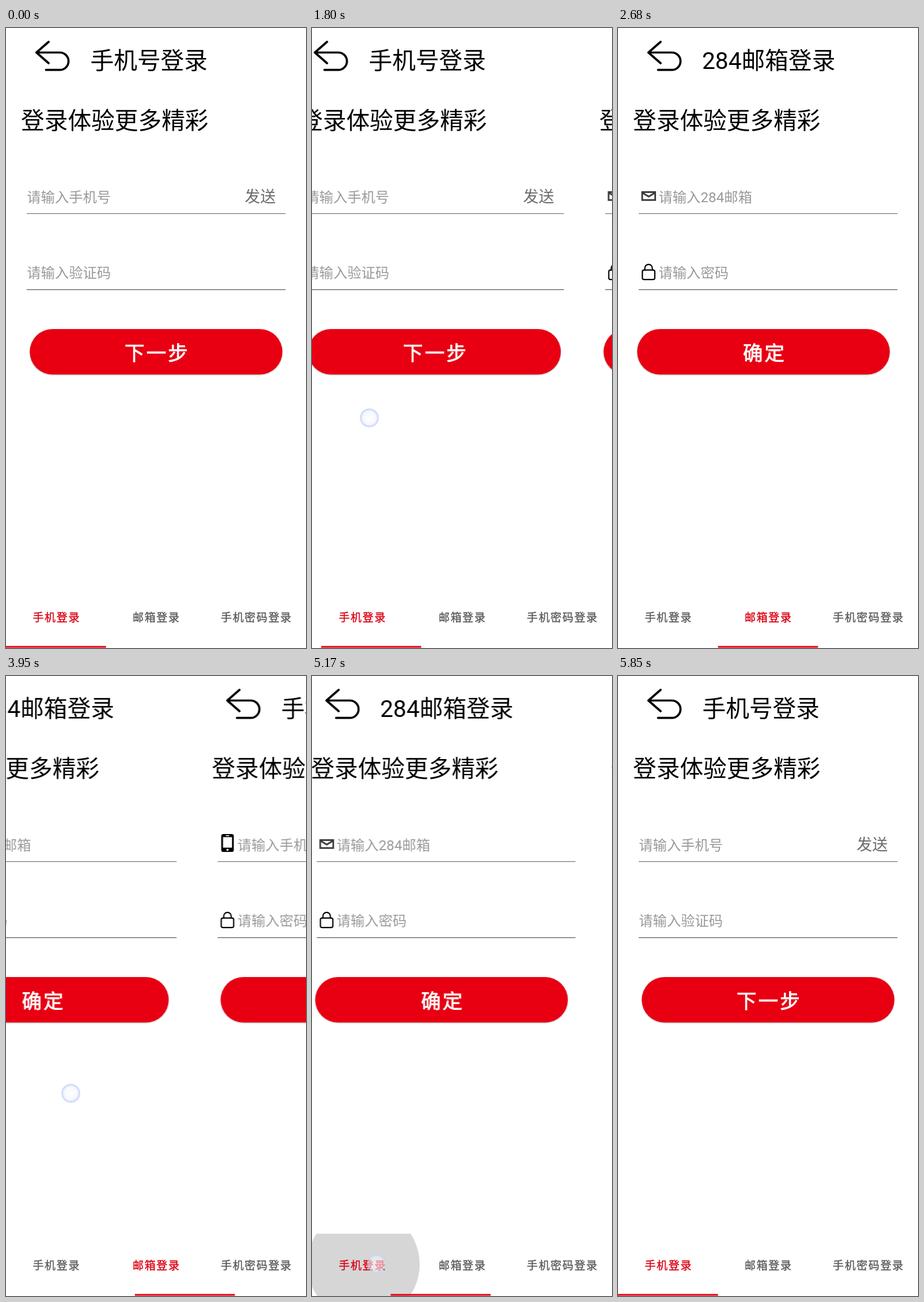
An HTML page that plays this animation: 521 by 1075 pixels, repeating every 6 s.

```html
<!DOCTYPE html>
<html lang="zh-CN">
<head>
<meta charset="utf-8">
<title>登录</title>
<style>
html, body { margin: 0; width: 100%; height: 100%; overflow: hidden; background: #fff; }
svg { display: block; width: 521px; height: 1075px; font-family: Roboto, "Noto Sans CJK SC", "Noto Sans CJK", sans-serif; }

.big { font-size: 40.7px; }
.hint { font-size: 24.3px; fill: #999; }
.send { font-size: 27px; fill: #6b6b6b; }
.btn { fill: #e80012; filter: drop-shadow(0 1.5px 1.3px rgba(0,0,0,.28)); }
.label, .tab { fill: currentColor; stroke: currentColor; }
.label { font-size: 34.5px; letter-spacing: 3.1px; color: #fff; stroke-width: .9px; }
.tab { font-size: 19px; letter-spacing: 1.67px; color: #5c5c5c; stroke-width: .4px; }
.stroke { fill: none; stroke: #000; stroke-linecap: round; stroke-linejoin: round; }

#pages, #bar, #ripple, #dot, .tab { animation: 6s linear infinite; }
#pages { animation-name: pages; }
#bar { animation-name: bar; fill: #e60012; }
#ripple { animation-name: ripple; }
#dot { animation-name: move, touch; }
.tab { animation-timing-function: step-end; }
.t1 { animation-name: tab1; }
.t2 { animation-name: tab2; }
.t3 { animation-name: tab3; }

@keyframes pages {
  0%, 27% { transform: translateX(0); animation-timing-function: ease-in; }
  30.02% { transform: translateX(-48px); }
  31.17% { transform: translateX(-125px); animation-timing-function: cubic-bezier(.22,1,.36,1); }
  39%, 62.33% { transform: translateX(-521px); animation-timing-function: ease-in; }
  65.85% { transform: translateX(-710.5px); }
  66.67% { transform: translateX(-830px); animation-timing-function: cubic-bezier(.22,1,.36,1); }
  71.5%, 84.17% { transform: translateX(-1042px); }
  86.18% { transform: translateX(-549.5px); animation-timing-function: cubic-bezier(.25,.5,.4,1); }
  91%, 100% { transform: translateX(0); }
}
@keyframes bar {
  0%, 27% { transform: translateX(0); animation-timing-function: ease-in; }
  30.02% { transform: translateX(16px); }
  31.17% { transform: translateX(41.7px); animation-timing-function: cubic-bezier(.22,1,.36,1); }
  39%, 62.33% { transform: translateX(173.67px); animation-timing-function: ease-in; }
  65.85% { transform: translateX(223.8px); }
  66.67% { transform: translateX(262px); animation-timing-function: cubic-bezier(.22,1,.36,1); }
  71.5%, 84.2% { transform: translateX(347.33px); animation-timing-function: cubic-bezier(.4,0,.2,1); }
  89.2%, 100% { transform: translateX(0); }
}
@keyframes ripple {
  0%, 79.67% { transform: translate(112px,1019px) scale(.2); opacity: 0; animation-timing-function: cubic-bezier(.2,.5,.4,1); }
  86.17%, 87% { transform: translate(89.5px,1020px) scale(.975); opacity: 1; }
  91%, 100% { transform: translate(87px,1021px) scale(1.02); opacity: 0; }
}
@keyframes move {
  0%, 26% { transform: translate(182px,672px); animation-timing-function: ease-in; }
  30.02% { transform: translate(99.5px,676px); }
  31.17%, 61% { transform: translate(30px,679px); }
  61.01%, 62% { transform: translate(326px,716px); animation-timing-function: ease-in; }
  65.85% { transform: translate(112.5px,723.5px); }
  66.67%, 77.9% { transform: translate(40px,726px); }
  78%, 100% { transform: translate(112px,1019px); }
}
@keyframes touch {
  0%, 25.16% { opacity: 0; }
  25.17%, 31.17% { opacity: 1; }
  31.2%, 60.99% { opacity: 0; }
  61.02%, 66.67% { opacity: 1; }
  66.7%, 77.99% { opacity: 0; }
  78.01%, 85% { opacity: 1; }
  86.17% { opacity: .7; }
  87%, 100% { opacity: 0; }
}
@keyframes tab1 {
  0% { color: #dc0012; }
  31.5% { color: #5c5c5c; }
  84.17%, 100% { color: #dc0012; }
}
@keyframes tab2 {
  31.5% { color: #dc0012; }
  66.8% { color: #5c5c5c; }
}
@keyframes tab3 {
  66.8% { color: #dc0012; }
  84.17% { color: #5c5c5c; }
}
</style>
</head>
<body>
<svg viewBox="0 0 521 1075">
  <defs>
    <g id="form">
      <path class="stroke" stroke-width="3.7" d="M74 24L52.8 42.5L74 61M52.8 42.5H93.5A15.1 15.1 0 0 1 93.5 72.7H69.5"/>
      <text class="big" x="26" y="174.5">登录体验更多精彩</text>
      <rect x="36" y="321" width="449.5" height="1.4" fill="#858585"/>
      <rect x="36" y="452.9" width="449.5" height="1.4" fill="#666"/>
    </g>
    <rect id="button" class="btn" x="41.3" y="522" width="438.7" height="78.7" rx="39.35"/>
    <g id="lock" class="stroke" stroke-width="2.2">
      <rect x="42.3" y="419.6" width="21.6" height="16.6" rx="3"/>
      <path d="M46.6 419.6V416.4a6.5 6.5 0 0 1 13 0V419.6"/>
    </g>
    <radialGradient id="glow">
      <stop offset="0" stop-color="#fff" stop-opacity=".75"/>
      <stop offset=".65" stop-color="#f4f7ff" stop-opacity=".8"/>
      <stop offset=".82" stop-color="#dfe7fd" stop-opacity=".9"/>
      <stop offset=".91" stop-color="#b9c9f6" stop-opacity=".95"/>
      <stop offset="1" stop-color="#d5e0fc" stop-opacity=".2"/>
    </radialGradient>
    <clipPath id="tabs"><rect y="967" width="521" height="108"/></clipPath>
  </defs>

  <rect width="521" height="1075" fill="#fff"/>

  <g id="pages">
    <g>
      <use href="#form"/>
      <text class="big" x="146.5" y="70.5">手机号登录</text>
      <text class="hint" x="36.3" y="301.7">请输入手机号</text>
      <text class="send" x="414.5" y="302">发送</text>
      <text class="hint" x="36.3" y="433.3">请输入验证码</text>
      <use href="#button"/>
      <text class="label" x="206.1" y="576">下一步</text>
    </g>
    <g transform="translate(521)">
      <use href="#form"/>
      <text class="big" x="146" y="70.5">284邮箱登录</text>
      <path d="M42 284.5H64.6V298.3H42ZM42 285.5L53.3 292.3L64.6 285.5" fill="none" stroke="#3c3c3c" stroke-width="2.9"/>
      <text class="hint" x="70.5" y="301.7">请输入284邮箱</text>
      <use href="#lock"/>
      <text class="hint" x="70.5" y="433.3">请输入密码</text>
      <use href="#button" x="-8"/>
      <text class="label" x="217" y="576">确定</text>
    </g>
    <g transform="translate(1042)">
      <use href="#form"/>
      <text class="big" x="146.5" y="70.5">手机号登录</text>
      <rect x="42.3" y="274" width="21.8" height="31" rx="3.6"/>
      <rect x="45.4" y="279.4" width="15.6" height="18.2" fill="#fff"/>
      <rect x="50" y="276" width="6.4" height="1.5" rx=".7" fill="#fff"/>
      <circle cx="53.2" cy="301.3" r="1.9" fill="#fff"/>
      <text class="hint" x="70.5" y="301.7">请输入手机号</text>
      <use href="#lock"/>
      <text class="hint" x="70.5" y="433.3">请输入密码</text>
      <use href="#button"/>
      <text class="label" x="225" y="576">确定</text>
    </g>
  </g>

  <g clip-path="url(#tabs)"><circle id="ripple" r="100" fill="#000" fill-opacity=".16"/></g>
  <text class="tab t1" x="46.4" y="1029">手机登录</text>
  <text class="tab t2" x="220" y="1029">邮箱登录</text>
  <text class="tab t3" x="373" y="1029">手机密码登录</text>
  <rect id="bar" y="1071.5" width="173.67" height="3"/>
  <circle id="dot" r="16.8" fill="url(#glow)"/>
</svg>
</body>
</html>
```
